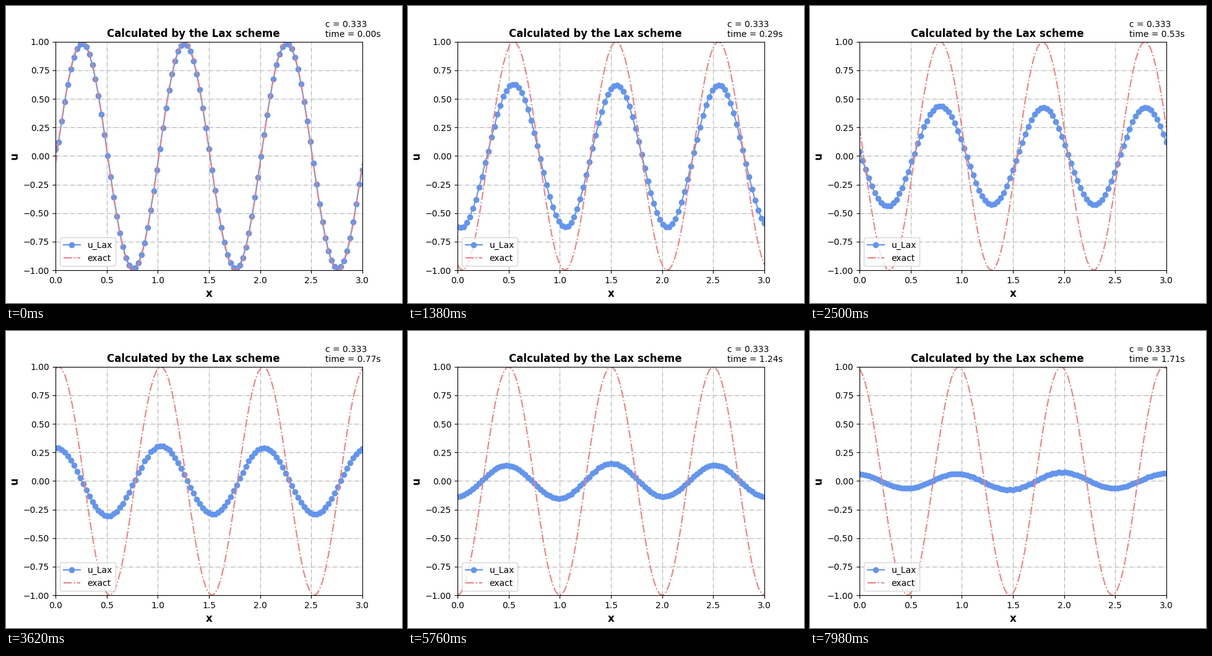
Write a matplotlib script that moves like this. It is 640 by 480 pixels and loops after 8 s.

```python
import numpy as np
import matplotlib.pyplot as plt
from matplotlib.animation import FuncAnimation

DX, DT = 0.03, 0.01
C = DT / DX
STEPS = 172
TICK = 20       # ms per animation frame
FRAMES = 400

x = np.linspace(0, 3, 101)


def lax_step(u):
    """One Lax step of u_t + u_x = 0 on a wrapped grid."""
    left, right = np.roll(u, 1), np.roll(u, -1)
    return (left + right) / 2 - C / 2 * (right - left)


def solve():
    u = np.sin(2 * np.pi * x)
    history = []
    for _ in range(STEPS):
        u = lax_step(u)
        history.append(u)
    return history


def step_at(frame):
    """Every third step is held for 100 ms, the others for 20 ms."""
    cycle, r = divmod(frame, 7)
    return 3 * cycle + (r > 0) + (r > 5)


history = solve()

fig, ax = plt.subplots(figsize=(6.4, 4.8), dpi=100)
ax.set_xlim(0, 3)
ax.set_ylim(-1, 1)
ax.grid(linestyle="-.")
ax.set_xlabel("x", fontsize=12, fontweight="bold")
ax.set_ylabel("u", fontsize=12, fontweight="bold")
ax.text(0.5, 1.04, "Calculated by the Lax scheme", fontsize=12, fontweight="bold")

lax_line, = ax.plot([], [], "o-", color="cornflowerblue", label="u_Lax")
exact_line, = ax.plot([], [], "-.", color="lightcoral", label="exact")
clock = ax.text(2.64, 1.04, "")
ax.legend(loc="lower left")


def update(frame):
    n = step_at(frame)
    lax_line.set_data(x, history[n])
    exact_line.set_data(x, np.sin(2 * np.pi * (x - (n + 1) * DT)))
    clock.set_text(f"c = {C:.3f}\ntime = {n * DT:.2f}s")
    return lax_line, exact_line, clock


anim = FuncAnimation(fig, update, frames=FRAMES, interval=TICK,
                     repeat=True, repeat_delay=0)
plt.show()
```
